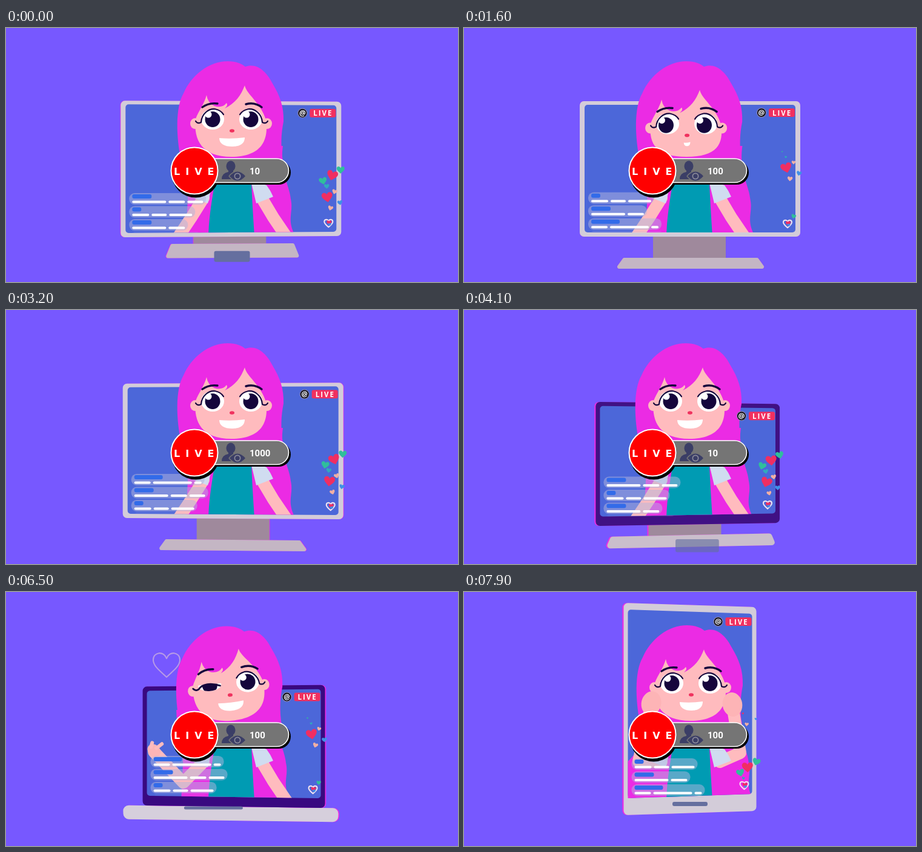
These frames come from a looping animation (746 by 420 pixels, 8 s). An HTML page with a canvas:

```html
<!DOCTYPE html>
<html lang="en">
<head>
<meta charset="utf-8">
<title>Live stream</title>
<style>
html, body { margin: 0; width: 746px; height: 420px; overflow: hidden; background: #7758ff; }
canvas { display: block; }
</style>
</head>
<body>
<canvas id="c" width="746" height="420"></canvas>
<script>
const g = document.getElementById('c').getContext('2d');
const LOOP = 8000, STEP = 100, TAU = Math.PI * 2;
const HAIR = '#eb2be4', SKIN = '#ffbbbe', INK = '#15063c', RED = '#f02e62';
const GREEN = '#2fbf9b', TEAL = '#31a9bd', PALE = '#f2b0a4', AZURE = '#3f8fe8';

// "half" values are half widths; sway and slant say how far a part follows the yaw
const MONITOR = {
  half: 182, top: 121, bottom: 345, side: 8, head: 6, chin: 7, sway: 5, slant: 2, dark: 0,
  baseTop: 111, baseBottom: 124, baseY: 380, baseEnd: 398, baseSway: 1, baseSlant: 2.8,
  keyY: 405, keyW: 60, keyH: 29, keySway: 0, keyShow: 0
};
const LAPTOP = {
  half: 150.5, top: 155, bottom: 355, side: 7, head: 7, chin: 16, sway: 4, slant: 1.8, dark: 1,
  baseTop: 178, baseBottom: 177, baseY: 355, baseEnd: 378, baseSway: -4, baseSlant: 3.2,
  keyY: 357, keyW: 97, keyH: 5, keySway: -40, keyShow: 2
};
const PHONE = {
  half: 109.5, top: 21.5, bottom: 365.5, side: 7, head: 11, chin: 28, sway: 0, slant: -3.5, dark: 0,
  baseTop: 92, baseBottom: 98, baseY: 333, baseEnd: 362, baseSway: 0, baseSlant: 0,
  keyY: 350.5, keyW: 58, keyH: 7, keySway: 0, keyShow: 2
};
const MORPH = 400, LAG = 200;

// length of the name, then of each dash of the message
const ROWS = [[47, 27, 64, 12], [32, 56, 27, 26], [15, 28, 25, 38], [32, 56, 27]];
const DRIFT = [20, 6, -9, -3, 10, -2, 19, 4];
const TINTS = [GREEN, RED, GREEN, TEAL, PALE, RED, AZURE, PALE];

const clamp = v => Math.max(0, Math.min(1, v));
const frac = v => v - Math.floor(v);
const lerp = (a, b, u) => a + (b - a) * u;
const ramp = (t, from, span) => {
  const u = clamp((t - from) / span);
  return u * u * (3 - 2 * u);
};
const bump = (t, from, to, span) => ramp(t, from, span) - ramp(t, to, span);
const blend = (a, b, u) => {
  const out = {};
  for (const k in a) out[k] = lerp(a[k], b[k], u);
  return out;
};
const tone = (a, b, u) => `rgb(${a.map((v, i) => Math.round(lerp(v, b[i], u)))})`;

function shapeAt(t) {
  if (t < 3000) return blend(PHONE, MONITOR, ramp(t, -MORPH, MORPH));
  if (t < 5500) return blend(MONITOR, LAPTOP, ramp(t, 3750, MORPH));
  return blend(LAPTOP, PHONE, ramp(t, 6850, MORPH));
}

function acts(t) {
  return {
    left: bump(t, 350, 1450, 450),
    right: bump(t, 1450, 2450, 450),
    wink: bump(t, 4200, 6200, 700),
    wave: bump(t, 4250, 6300, 600),
    cheeks: ramp(t, 6900, 500)
  };
}

function fill(color, d) { g.fillStyle = color; g.fill(new Path2D(d)); }

function line(d, w, color = INK) {
  g.strokeStyle = color;
  g.lineWidth = w;
  g.stroke(new Path2D(d));
}

function oval(x, y, rx, ry, color, turn = 0) {
  g.beginPath();
  g.ellipse(x, y, rx, ry, turn, 0, TAU);
  g.fillStyle = color;
  g.fill();
}

function pill(x, y, w, h, r, color) {
  g.beginPath();
  g.roundRect(x, y, w, h, r);
  g.fillStyle = color;
  g.fill();
}

function quad(p, r, color, dx = 0) {
  g.beginPath();
  g.moveTo((p[0] + p[2]) / 2 + dx, (p[1] + p[3]) / 2);
  for (let i = 1; i <= 4; i++) {
    const a = i % 4 * 2, b = (i + 1) % 4 * 2;
    g.arcTo(p[a] + dx, p[a + 1], p[b] + dx, p[b + 1], r);
  }
  g.closePath();
  g.fillStyle = color;
  g.fill();
}

function heart(x, y, s, color, turn = 0, outline = 0) {
  g.save();
  g.translate(x, y);
  g.rotate(turn);
  g.scale(s / 20, s / 20);
  const d = 'M0 9C-4 5 -10 1 -10 -4C-10 -10 -2 -11 0 -5C2 -11 10 -10 10 -4C10 1 4 5 0 9Z';
  if (outline) line(d, outline * 20 / s, color);
  else fill(color, d);
  g.restore();
}

function label(s, x, y, font, gap = 0) {
  g.font = font;
  g.letterSpacing = gap + 'px';
  g.fillStyle = '#fff';
  g.fillText(s, x, y);
}

// corners of the lit area and its frame
function layout(s, yaw) {
  const x = 373 + s.sway * yaw, tip = s.slant * yaw, dip = tip * 1.5;
  const l = x - s.half, r = x + s.half;
  const frame = [l, s.top + tip, r, s.top - tip, r, s.bottom + dip, l, s.bottom - dip];
  // a phone leans the same way at both ends
  if (s.slant < 0) {
    frame[1] = s.top + s.slant;
    frame[3] = s.top - s.slant;
    frame[5] = s.bottom + s.slant;
    frame[7] = s.bottom - s.slant;
  }
  const inset = [s.side, s.head, -s.side, s.head, -s.side, -s.chin, s.side, -s.chin];
  return { frame, glass: frame.map((v, i) => v + inset[i]) };
}

function stand(s, yaw, floor) {
  const x = 374 + s.baseSway * yaw, tip = s.baseSlant * yaw;
  const base = [
    x - s.baseTop, s.baseY - tip, x + s.baseTop, s.baseY + tip,
    x + s.baseBottom, s.baseEnd + tip, x - s.baseBottom, s.baseEnd - tip
  ];
  const glow = 2.2 * yaw, r = 3 + 6 * s.dark;
  if (s.baseY > floor) {
    const n = 372 + 8 * yaw;
    const neck = [n - 60, floor - 5, n + 60, floor - 5, n + 60, s.baseY + 4, n - 60, s.baseY + 4];
    quad(neck, 0, HAIR, glow);
    quad(neck, 0, '#9f899c');
  }
  quad(base, r, HAIR, glow);
  quad(base, r, tone([196, 182, 196], [214, 207, 220], s.dark));
}

function device(t, s, box, yaw) {
  const b = shapeAt(t - LAG);
  stand(b, yaw, s.bottom);
  quad(box.frame, 7, HAIR, 2.2 * yaw);
  quad(box.frame, 7, tone([211, 204, 217], [57, 9, 128], s.dark));
  quad(box.glass, 5, '#4c67d9');
  g.globalAlpha = clamp(b.keyShow);
  pill(373 + b.keySway * yaw - b.keyW / 2, b.keyY - b.keyH / 2, b.keyW, b.keyH, 3, '#656f9f');
  g.globalAlpha = 1;
}

function body(a) {
  const left = 297 - 32 * a.cheeks;
  g.save();
  g.translate(5 * a.left - 5 * a.right - 13 * a.wink, 0);
  fill(HAIR, `M289 195C290 235 300 255 ${left + 3} 282L${left} 345H478C462 316 475 306 470 283C468 260 451 238 457 195Z`);
  g.restore();
  pill(354, 205, 38, 60, 8, SKIN);
  fill('#009bb3', 'M345 252H405C406 285 408 310 410 345H334C335 310 340 285 345 252Z');
}

function hand(x, y, ex, ey, size) {
  oval(x, y - 2, 16 * size, 13 * size, '#fdb4b6', Math.atan2(y - ey, x - ex));
}

function arms(a) {
  const c = a.cheeks, w = a.wave;
  // the forearm swings around the elbow while waving
  const angle = lerp(2.16, 4.58, w), reach = 39 + 77 * w ** 3;
  const ex = lerp(306 - 18 * w, 288, c), ey = lerp(313 + 3 * w, 280, c);
  const hx = lerp(ex + Math.cos(angle) * reach, 309, c);
  const hy = lerp(ey + Math.sin(angle) * reach, 186, c);
  const rx = lerp(441, 456, c), ry = lerp(313, 266, c);
  const kx = lerp(464, 443, c), ky = lerp(347, 188, c);
  line(`M326 281L${ex} ${ey}L${hx} ${hy}`, 20, SKIN);
  line(`M422 281L${rx} ${ry}L${kx} ${ky}`, 20, SKIN);
  hand(hx, hy, ex, ey, Math.max(w, 1.25 * c));
  hand(kx, ky, rx, ry, 1.25 * c);
  if (w > .3) line(`M${hx - 5} ${hy - 8}l2 -7M${hx + 4} ${hy - 6}l9 -7`, 8 * w, SKIN);
  const cuff = 'M404 252L430 260Q437 269 441 279L413 290Z';
  fill('#d0dcf0', cuff);
  g.save();
  g.translate(746, 0);
  g.scale(-1, 1);
  fill('#d0dcf0', cuff);
  g.restore();
}

function eye(x, side, open, px, py) {
  const y = 151, ry = 17 * Math.max(open, .55);
  g.save();
  if (open < 1) {
    g.beginPath();
    g.rect(x - 24, y + 9 - 27 * open, 48, 60);
    g.clip();
  }
  if (open > .1) {
    oval(x, y, 19, ry, '#fff');
    g.clip();
    oval(x + px, y + py, 12.5, 13, INK);
    oval(x + px - 7, y + py - 8, 5.5, 5.5, '#fff');
  }
  g.restore();
  g.save();
  g.translate(x, y);
  g.scale(side, 1);
  if (open > .9) line('M-28 3Q-25 8 -19 5C-18 -10 -6 -18 4 -17Q14 -15 18 -8', 2.2);
  else if (open > .2) line('M-28 3Q-24 8 -19 5C-12 -4 2 -4 17 2', 2.8);
  else line('M-27 8Q-16 9 -7 3Q4 -2 17 5M-6 -3Q6 -4 17 5M-3 6L6 5', 2.3);
  g.restore();
}

function head({ left, right, wink, cheeks }) {
  g.save();
  g.translate(3 * left - 4 * right - 3 * wink + 2 * cheeks, 2.5 * wink);
  fill(HAIR, 'M289 220C281 180 279 132 293 108C306 78 335 55 366 55C380 55 389 59 395 64C414 57 430 72 440 92C452 112 459 130 458 155C454 175 453 195 457 220Z');
  g.restore();

  const fx = -8 * left + 4 * right - 5 * wink + 2 * cheeks, fy = 8 * left + 6 * right + wink;
  const px = -6 * left + 7 * right, py = 3 * left;
  const mw = 21 - 18 * left - 9 * right - 2 * cheeks, mh = 15 - 9 * left - 6 * right;
  // the chin stays put while the face slides down
  const chin = 213 - fy;
  g.save();
  g.translate(370 + fx, 170 + fy);
  g.rotate(-.155 * wink);
  g.translate(-370, -170);
  oval(312, 158, 8, 9, SKIN);
  oval(431, 158, 8, 9, SKIN);
  fill(SKIN, `M394 95C397 110 421 124 429 152C434 185 422 ${chin} 372 ${chin}C324 ${chin} 309 186 313 150C318 137 327 126 331 111Q333 124 344 129Q357 133 364 124C366 127 365 129 361 133C379 124 388 111 394 95Z`);
  eye(341, 1, 1 - wink, px, py);
  eye(404, -1, 1, px, py);
  line('M324 131Q335 123 349 125', 3.4);
  line('M396 126Q410 122 422 131', 3.4);
  oval(373, 170, 4, 2.8, '#f0325f');
  fill('#fff', `M${373 - mw} 182Q373 ${182 + mh * .12} ${373 + mw} 181C${373 + mw} ${181 + mh * .8} ${373 + mw * .5} ${181 + mh} 373 ${181 + mh}C${373 - mw * .6} ${181 + mh} ${373 - mw} ${181 + mh * .7} ${373 - mw} 182Z`);
  g.restore();
}

// the head may rise out of the screen, the body ends at its lower edge
function girl(a, glass) {
  const l = glass[6], r = glass[4], out = a.cheeks ? 0 : 200;
  g.save();
  g.beginPath();
  g.moveTo(l - out, 0);
  g.lineTo(r + out, 0);
  g.lineTo(r + out, glass[5]);
  g.lineTo(r, glass[5]);
  g.lineTo(l, glass[7]);
  g.lineTo(l - out, glass[7]);
  g.clip();
  body(a);
  head(a);
  arms(a);
  g.restore();
}

function comments(t, x, floor) {
  const n = t / 860, shift = ramp(frac(n), .85, .15), y = floor - 66;
  g.save();
  g.beginPath();
  g.rect(x, y - 1, 160, 66);
  g.clip();
  for (let i = 0; i < 4; i++) {
    const [name, ...dashes] = ROWS[(Math.floor(n) + 1 + i) % 4];
    const top = y + (i - shift) * 21.5;
    const wide = dashes.reduce((sum, w) => sum + w + 4, 6);
    pill(x + 6, top, wide, 19, 9, 'rgba(178,182,222,.5)');
    pill(x + 11, top + 2, name, 7, 3, '#326be9');
    let dx = x + 11;
    for (const w of dashes) {
      pill(dx, top + 12.5, w, 4, 2, '#fff');
      dx += w + 4;
    }
  }
  g.restore();
}

function badge(t, x, y) {
  oval(x, y, 8, 8, '#8e86a8');
  oval(x, y, 7, 7, '#14121f');
  g.save();
  g.translate(x, y);
  g.rotate(Math.sin(t / 600) * .5);
  g.textAlign = 'center';
  label('@', 0, 4, 'bold 12px "Open Sans", sans-serif');
  g.restore();
  pill(x + 12, y - 7, 43, 14, 3, '#f1305f');
  label('LIVE', x + 18, y + 4.5, 'bold 11.5px "Open Sans", sans-serif', 2);
}

function stream(t, x, y) {
  const u = t / 1040 - .15 * Math.sin(TAU * t / LOOP);
  TINTS.forEach((tint, i) => {
    const p = frac((88 - 9 * i) / 125 + u);
    const size = tint === RED ? 18 : tint === GREEN ? 13 : 8.5;
    const scale = Math.min(1, p * 6, (1 - p) * 4);
    const dx = DRIFT[i] * Math.min(1, .2 + p * 3);
    heart(x + dx, y - p * 125, size * scale, tint, Math.sin(i * 2 + u) * .3);
  });
  heart(x, y, 14, '#f3e4f0', 0, 2);
  heart(x + 1, y - 1, 8, RED);
  heart(x + 2, y + 2, 5, AZURE);
}

function bigHeart(t) {
  if (t < 4650 || t > 6800) return;
  const rise = ramp(t, 5700, 600), size = (32 + 12 * rise) * ramp(t, 4600, 300);
  const y = 141 - 20 * rise;
  g.globalAlpha = clamp((6800 - t) / 200);
  if (t < 6100) heart(264, y, size, '#e82c63', -.08);
  else heart(265, y, size, '#b79be6', 0, 2);
  g.globalAlpha = 1;
}

function counter(t) {
  pill(315, 219, 155, 40, 20, '#000');
  oval(313, 241, 39.5, 39.5, '#000');
  pill(311, 216, 155.5, 39.5, 20, '#757575');
  g.strokeStyle = '#fff';
  g.lineWidth = 1.6;
  g.stroke();
  oval(311, 236, 38.5, 38.5, '#f00');
  g.lineWidth = 2;
  g.stroke();
  label('LIVE', 277, 242.5, 'bold 16px "DejaVu Sans", sans-serif', 9);

  const navy = '#3b3e66', lid = 'M369 245Q382 230 395 245Q382 260 369 245Z';
  oval(371, 228.5, 7.5, 9, navy);
  fill(navy, 'M367 234H375V238Q385 240 386 250H356Q356 240 367 238Z');
  line(lid, 3, '#757575');
  fill(navy, lid);
  oval(382, 245, 5.5, 5.5, '#8b8b9a');
  oval(382, 245, 3.8, 3.8, navy);

  const digits = 1 + Math.floor((t + 100) % 700 / 233.4);
  label(String(10 ** digits), 402, 241.5, 'bold 15px Roboto, sans-serif');
}

function draw(t) {
  g.fillStyle = '#7758ff';
  g.fillRect(0, 0, 746, 420);
  g.lineCap = g.lineJoin = 'round';
  const yaw = -Math.cos(TAU * (t - 700) / 3600);
  const s = shapeAt(t), box = layout(s, yaw), q = box.glass;
  device(t, s, box, yaw);
  girl(acts(t), q);
  bigHeart(t);
  comments(t, q[6], q[7]);
  badge(t, q[2] - 56, q[3] + 13);
  stream(t, q[4] - 13, q[5] - 14);
  counter(t);
}

const start = performance.now();
function tick(now) {
  const t = Math.max(0, now - start) % LOOP;
  draw(Math.floor(t / STEP) * STEP);
  requestAnimationFrame(tick);
}
draw(0);
requestAnimationFrame(tick);
</script>
</body>
</html>
```
